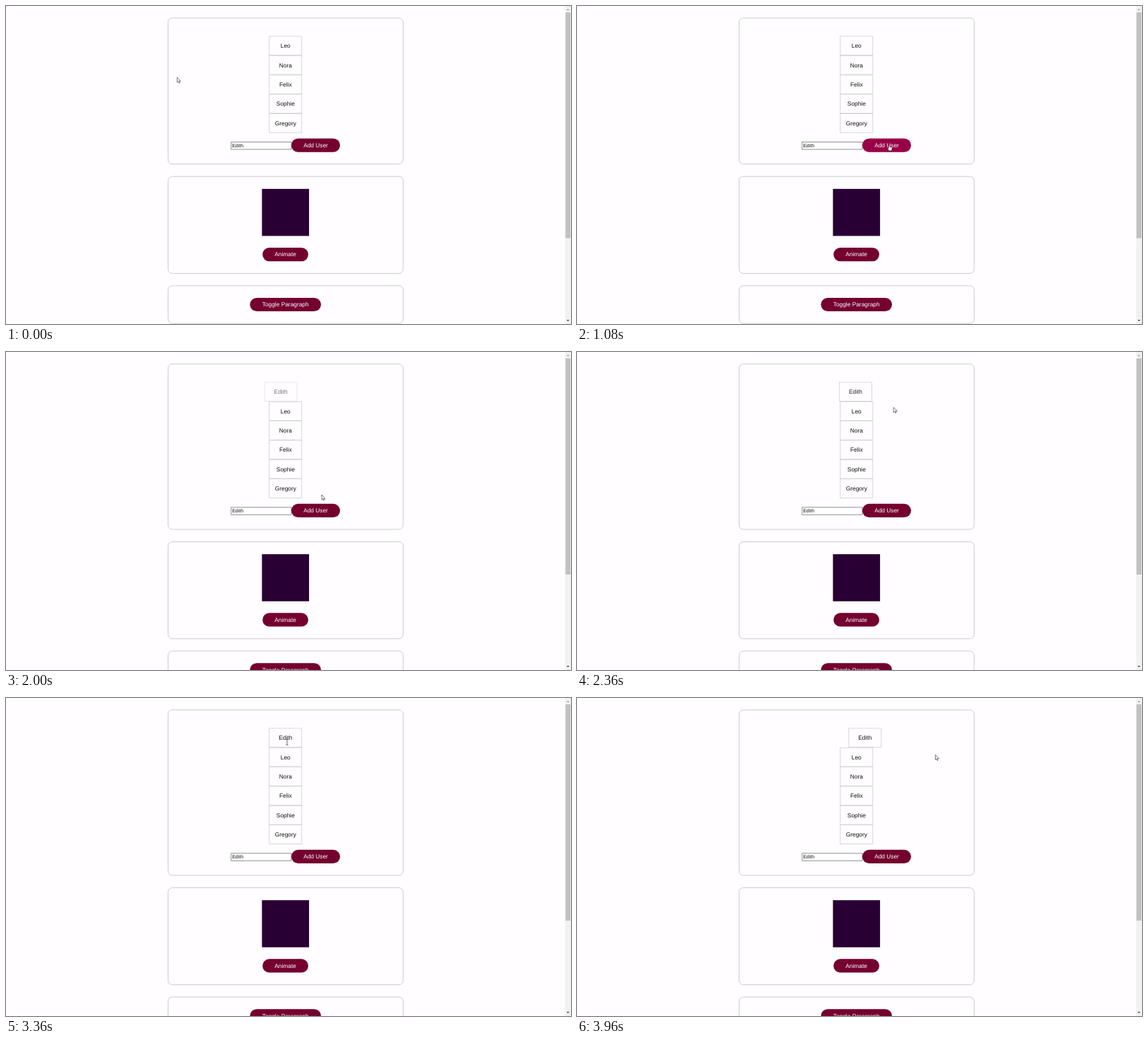
Animation, 800 px wide and 450 px high, one loop 4 s. Source, as an HTML page:

```html
<!DOCTYPE html>
<html lang="en">
<head>
<meta charset="utf-8">
<title>List transitions</title>
<style>
  html, body { margin: 0; width: 100%; height: 100%; overflow: hidden; background: #fffdff; }
  svg { display: block; width: 800px; height: 450px; }
  text { font: 8.333px "Liberation Sans", Arial, sans-serif; text-anchor: middle; fill: #111; text-rendering: geometricPrecision; }
  .card { fill: none; stroke: #ccc; stroke-width: 1; }
  .item rect { fill: none; stroke: #ccc; stroke-width: .75; }
  .button rect { fill: #74002f; }
  .button.hover rect { fill: #990046; }
  .button text { fill: #fff; }
  .input rect { fill: #fff; stroke: #767676; stroke-width: .8; }
  .input text { font-size: 6.944px; text-anchor: start; }
  .pointer { fill: #fff; stroke: #222; stroke-width: .6; stroke-linejoin: round; }
</style>
</head>
<body>
<svg id="stage" viewBox="0 0 800 450"></svg>
<script>
const LOOP = 4000, FRAME = 40, ADDED = 1600, REMOVED = 3440;
const ROW = 27.34, CENTER = 395.8, ENTER_SHIFT = -15.6;
const users = ["Leo", "Nora", "Felix", "Sophie", "Gregory"];
const newUser = "Edith";

// Pointer positions: time, x, y
const path = [
  [0, 242.3, 101], [200, 227, 118], [360, 280, 146], [560, 371, 160], [720, 400, 163],
  [960, 441, 194], [1120, 442.5, 197], [1600, 442.5, 197], [1800, 443, 202],
  [2000, 447, 202], [2120, 458, 180], [2240, 474, 125], [2360, 448.2, 78.3],
  [2560, 425, 66], [2760, 402, 61], [3360, 398, 62.5], [3720, 398, 62.5],
  [3840, 432, 69], [3920, 480, 80], [3960, 507.3, 80.3], [4000, 507.3, 80.3]
];

const card = (y, h) => `<rect class="card" x="229.5" y="${y}" width="332.8" height="${h}" rx="6"/>`;
const button = (id, x, y, w, label) => `<g class="button" id="${id}">
  <rect x="${x}" y="${y}" width="${w}" height="19.2" rx="9.6"/>
  <text x="${x + w / 2}" y="${y + 12.3}">${label}</text></g>`;
const item = (name, row, id = "") => `<g class="item" id="${id}">
  <rect x="372.8" y="${42.9 + row * ROW}" width="46" height="${ROW - .5}"/>
  <text x="${CENTER}" y="${59.2 + row * ROW}">${name}</text></g>`;

const stage = document.getElementById("stage");
stage.innerHTML = `
  <rect width="800" height="450" fill="#fffdff"/>
  <rect class="card" id="listCard" x="229.5" y="16.9" width="332.8" height="206.8" rx="6"/>
  ${item(newUser, 0, "added")}
  <g id="below">
    ${users.map((name, row) => item(name, row)).join("")}
    <g class="input">
      <rect x="318.8" y="192.5" width="85.2" height="10.4"/>
      <text x="320.2" y="200">${newUser}</text>
    </g>
    ${button("addUser", 404, 187.5, 69, "Add User")}
    ${card(241.2, 137.2)}
    <rect x="362.4" y="258.8" width="66.7" height="66.6" fill="#290033"/>
    ${button("animate", 363.2, 342, 64.8, "Animate")}
    ${card(395.8, 53.5)}
    ${button("toggle", 345.4, 412.9, 100.6, "Toggle Paragraph")}
  </g>
  <rect x="791.6" width="8.4" height="450" fill="#f1f1f1"/>
  <rect id="thumb" x="792.2" y="9" width="7" height="319.5" fill="#c1c1c1"/>
  <path d="M793.7 6l2-2.2 2 2.2z" fill="#a3a3a3"/>
  <path d="M793.7 444l2 2.2 2-2.2z" fill="#505050"/>
  <g id="pointer">
    <path class="pointer" id="arrow" d="M0 0V7.2L1.6 5.7L2.8 8.2L3.9 7.7L2.8 5.3H5Z"/>
    <path class="pointer" id="hand" d="M-.8 .2Q0-.8 .7 .2V3L3.6 3.6Q4.2 4 4 5.5L3.2 8.6H-.3L-2.4 5.4Q-2.2 4.3-.8 5.2Z"/>
    <path id="beam" d="M-1.6-4H-.4L0-3.5L.4-4H1.6M0-3.5V3.5M-1.6 4H-.4L0 3.5L.4 4H1.6" fill="none" stroke="#333" stroke-width=".7"/>
  </g>`;
const el = id => document.getElementById(id);

function pointerAt(t) {
  const i = path.findIndex(key => key[0] > t);
  const [t0, x0, y0] = path[i - 1], [t1, x1, y1] = path[i];
  const k = (t - t0) / (t1 - t0);
  return [x0 + (x1 - x0) * k, y0 + (y1 - y0) * k];
}

// Same curve as CSS ease-out: cubic-bezier(0, 0, .58, 1)
function easeOut(x) {
  if (x >= 1) return 1;
  let low = 0, high = 1;
  for (let i = 0; i < 20; i++) {
    const s = (low + high) / 2;
    if (1.74 * s * s * (1 - s) + s ** 3 < x) low = s; else high = s;
  }
  return low * low * (3 - 2 * low);
}

function draw(t) {
  const added = t >= ADDED;
  const entered = added ? easeOut((t - ADDED) / 1000) : 0;
  const leaving = t > REMOVED ? 12 * ((t - REMOVED) / 520) ** 1.8 : 0;
  el("added").setAttribute("opacity", entered);
  el("added").setAttribute("transform", `translate(${ENTER_SHIFT * (1 - entered) + leaving})`);
  el("below").setAttribute("transform", `translate(0 ${added ? ROW : 0})`);
  el("listCard").setAttribute("height", 206.8 + (added ? ROW : 0));
  el("thumb").setAttribute("height", added ? 306 : 319.5);

  const [x, y] = pointerAt(t);
  const hover = !added && x > 404 && y > 187.5;
  const shape = hover ? "hand" : t >= 2760 && t < 3760 ? "beam" : "arrow";
  el("addUser").classList.toggle("hover", hover);
  el("pointer").setAttribute("transform", `translate(${x} ${y})`);
  for (const id of ["arrow", "hand", "beam"])
    el(id).style.display = id === shape ? "" : "none";
}

function tick() {
  const t = performance.now() % LOOP;
  draw(Math.floor(t / FRAME) * FRAME);
  requestAnimationFrame(tick);
}
tick();
</script>
</body>
</html>
```
